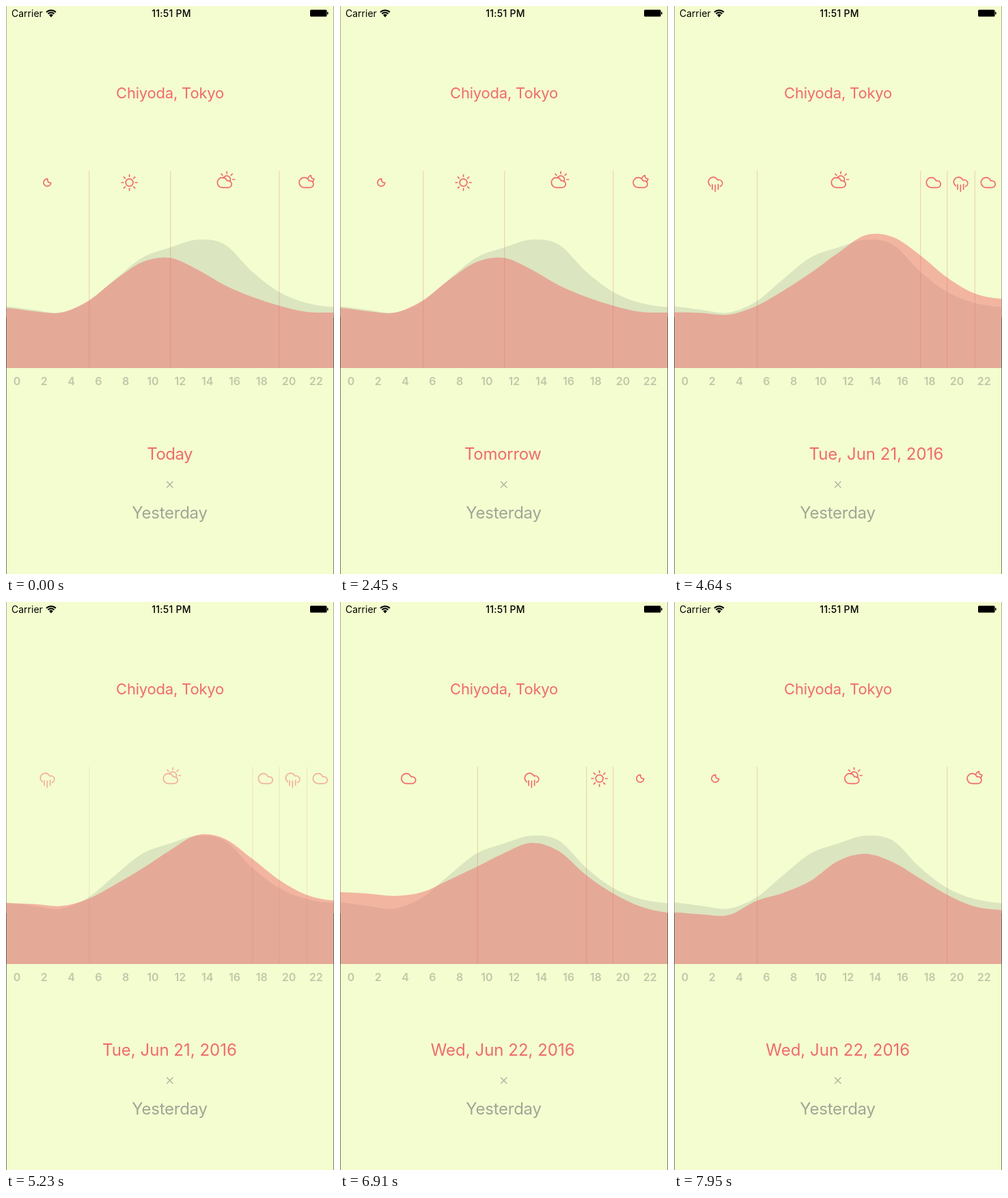
These frames come from a looping animation (480 px wide and 830 px high, 8 s). An HTML page with a canvas:

```html
<!DOCTYPE html>
<html lang="en">
<head>
<meta charset="utf-8">
<style>
  html, body { margin: 0; width: 100%; height: 100%; overflow: hidden; background: #f4fdcf; }
  canvas { display: block; width: 480px; height: 830px; }
</style>
</head>
<body>
<canvas id="stage" width="480" height="830"></canvas>
<script>
const ctx = document.getElementById('stage').getContext('2d');
const LOOP = 8000, W = 480, H = 830, BASE = 529;
const BG = '#f4fdcf', RED = '#ef6b6e', GREY = '#9da798', RULE = '#dc6a62';
const FONT = 'Inter, "Open Sans", sans-serif';

// Curve heights every 40 px, section edges and one icon per section
const yesterday = [439, 444, 448, 432, 399, 367.5, 353, 341.5, 348.5, 388, 418, 434, 440];
const days = [
  { name: 'Today', gap: -0.5, edges: [121.5, 240.5, 399.5],
    icons: [moon, sun, cloudSun, cloudMoon],
    curve: [441, 446, 448, 431, 400, 374, 368, 385, 408, 425, 438, 447, 448] },
  { name: 'Tomorrow', gap: -0.3, edges: [121.5, 360.5, 399.5, 440],
    icons: [rain, cloudSun, cloud, rain, cloud],
    curve: [447.5, 448.5, 451, 438.5, 416, 390, 361, 335, 337.5, 364, 397, 420, 428] },
  { name: 'Tue, Jun 21, 2016', gap: 0, edges: [201, 360.5, 399.5],
    icons: [cloud, rain, sun, moon],
    curve: [424, 426, 429.5, 424, 406, 387, 367, 352, 364, 399, 426, 445, 454] },
  { name: 'Wed, Jun 22, 2016', gap: 0, edges: [121.5, 399.5],
    icons: [moon, cloudSun, cloudMoon],
    curve: [453.5, 456.5, 457.5, 437, 425, 407.5, 378.5, 368, 380, 404, 428, 445, 450] }
];

// Moments when each next label enters
const enters = [1833, 4480, 6310];
const EXIT = 225, SETTLE = 640, MORPH = 930, FADE = 230, REACH = 345;
const rad = deg => deg * Math.PI / 180;
const clamp = v => Math.max(0, Math.min(1, v));

function text(str, x, y, size, weight, color, align = 'center', gap = 0) {
  ctx.font = `${weight} ${size}px ${FONT}`;
  ctx.letterSpacing = gap + 'px';
  ctx.textAlign = align;
  ctx.fillStyle = color;
  ctx.fillText(str, x, y);
}

function area(ys, color, alpha) {
  const step = W / (ys.length - 1);
  const at = i => ys[Math.max(0, Math.min(ys.length - 1, i))];
  const slope = i => (at(i + 1) - at(i - 1)) / 6;
  ctx.beginPath();
  ctx.moveTo(0, BASE);
  ctx.lineTo(0, ys[0]);
  for (let i = 0; i < ys.length - 1; i++) {
    const x = i * step;
    ctx.bezierCurveTo(x + step / 3, ys[i] + slope(i),
      x + step * 2 / 3, ys[i + 1] - slope(i + 1), x + step, ys[i + 1]);
  }
  ctx.lineTo(W, BASE);
  ctx.closePath();
  ctx.globalAlpha = alpha;
  ctx.fillStyle = color;
  ctx.fill();
  ctx.globalAlpha = 1;
}

function rays(x, y, from, count) {
  for (let i = 0; i < count; i++) {
    const a = rad(from + i * 45), c = Math.cos(a), s = Math.sin(a);
    ctx.moveTo(x + c * 8.7, y + s * 8.7);
    ctx.lineTo(x + c * 11.5, y + s * 11.5);
  }
}

function moon() {
  ctx.arc(0, 0, 5.4, rad(-85), rad(5), true);
  ctx.quadraticCurveTo(-0.3, 0.3, 0.5, -5.4);
  ctx.closePath();
}

function sun() {
  ctx.arc(0, 0, 5.4, 0, Math.PI * 2);
  rays(0, 0, 0, 8);
}

function cloud() {
  ctx.moveTo(-3, 7.3);
  ctx.arc(-3, 0, 7.3, rad(90), rad(-28));
  ctx.arc(5.6, 2.3, 5, rad(-108), rad(90));
  ctx.closePath();
}

function rain() {
  ctx.arc(-3, -0.8, 7, rad(125), rad(-28));
  ctx.arc(5.6, 1, 4.9, rad(-108), rad(70));
  for (const [x, top, end] of [[-4.3, 3, 10], [0, 3.5, 13], [4.3, 2.5, 10]]) {
    ctx.moveTo(x, top);
    ctx.lineTo(x, end);
  }
}

function cloudSun() {
  cloud();
  ctx.moveTo(3.5 + 5.4 * Math.cos(rad(200)), -4.5 + 5.4 * Math.sin(rad(200)));
  ctx.arc(3.5, -4.5, 5.4, rad(200), rad(35));
  rays(3.5, -4.5, -135, 4);
}

function cloudMoon() {
  cloud();
  ctx.moveTo(2.5, -6.5);
  ctx.quadraticCurveTo(4, -10, 7, -10.5);
  ctx.quadraticCurveTo(6.5, -5.5, 11.5, -5.5);
  ctx.quadraticCurveTo(11, -2.5, 9, -1);
}

function sections(day, alpha) {
  if (alpha <= 0) return;
  ctx.fillStyle = RULE;
  ctx.globalAlpha = alpha * 0.33;
  for (const x of day.edges) ctx.fillRect(x - 0.2, 241, 1, BASE - 241);
  ctx.strokeStyle = RED;
  ctx.globalAlpha = alpha;
  ctx.lineWidth = 1.7;
  ctx.lineCap = ctx.lineJoin = 'round';
  const stops = [0, ...day.edges, W];
  day.icons.forEach((icon, i) => {
    ctx.save();
    ctx.translate((stops[i] + stops[i + 1]) / 2 - 0.4, 258);
    ctx.beginPath();
    icon();
    ctx.stroke();
    ctx.restore();
  });
  ctx.globalAlpha = 1;
}

function statusBar() {
  text('Carrier', 8, 16, 14, 400, '#000', 'left');
  text('11:51 PM', 242, 16, 14, 500, '#000', 'center', 0.25);
  ctx.strokeStyle = ctx.fillStyle = '#000';
  ctx.lineCap = 'butt';
  ctx.lineWidth = 2;
  for (const r of [9.8, 6.4]) {
    ctx.beginPath();
    ctx.arc(66, 16, r, rad(-135), rad(-45));
    ctx.stroke();
  }
  ctx.beginPath();
  ctx.moveTo(66, 16.5);
  ctx.arc(66, 16, 4, rad(-135), rad(-45));
  ctx.fill();
  ctx.beginPath();
  ctx.roundRect(445, 5.5, 24.5, 10, 1.5);
  ctx.roundRect(470, 8.5, 1.5, 4, 0.7);
  ctx.fill();
}

function label(t) {
  let i = 0;
  while (i < enters.length && t >= enters[i]) i++;
  let dx = 0;
  if (i > 0) {
    const s = (t - enters[i - 1]) / 1000;
    dx = REACH * Math.exp(-9 * s) * Math.cos(5 * s);
  }
  if (i < enters.length) {
    const p = clamp((t - enters[i] + EXIT) / EXIT);
    dx -= REACH * p * p;
  }
  text(days[i].name, 239.7 + dx, 663, 24, 400, RED, 'center', days[i].gap);
}

function chart(t) {
  let i = 0;
  while (i < enters.length && t >= enters[i] + SETTLE) i++;
  const since = i ? t - enters[i - 1] - SETTLE : MORPH;
  const p = 1 - Math.pow(1 - clamp(since / MORPH), 3);
  const now = days[i], before = days[Math.max(0, i - 1)];
  area(yesterday, '#a0aa97', 0.29);
  area(now.curve.map((y, k) => before.curve[k] + (y - before.curve[k]) * p), RED, 0.49);
  sections(before, i ? 1 - clamp(since / FADE) : 0);
  sections(now, clamp((since - FADE) / FADE));
}

function edges() {
  ctx.globalAlpha = 0.65;
  for (const x of [0, W - 1]) {
    ctx.fillStyle = '#8b8468';
    ctx.fillRect(x, 0, 1, 455);
    ctx.fillStyle = '#1f4a2e';
    ctx.fillRect(x, 455, 1, H - 455);
  }
  ctx.globalAlpha = 1;
}

function draw(t) {
  ctx.fillStyle = BG;
  ctx.fillRect(0, 0, W, H);
  statusBar();
  text('Chiyoda, Tokyo', 240, 135, 22, 400, RED, 'center', -0.2);
  chart(t);
  for (let i = 0; i < 12; i++) {
    text(String(i * 2), 16 + i * 39.8, 554, 16, 600, '#c0c7a9');
  }
  label(t);
  ctx.strokeStyle = '#a9b29f';
  ctx.lineWidth = 1.3;
  ctx.beginPath();
  ctx.moveTo(235.5, 695);
  ctx.lineTo(244, 703.5);
  ctx.moveTo(244, 695);
  ctx.lineTo(235.5, 703.5);
  ctx.stroke();
  text('Yesterday', 239.5, 749, 24, 400, GREY, 'center', -0.25);
  edges();
}

const start = performance.now();
function tick() {
  draw((performance.now() - start) % LOOP);
  requestAnimationFrame(tick);
}
tick();
</script>
</body>
</html>
```
